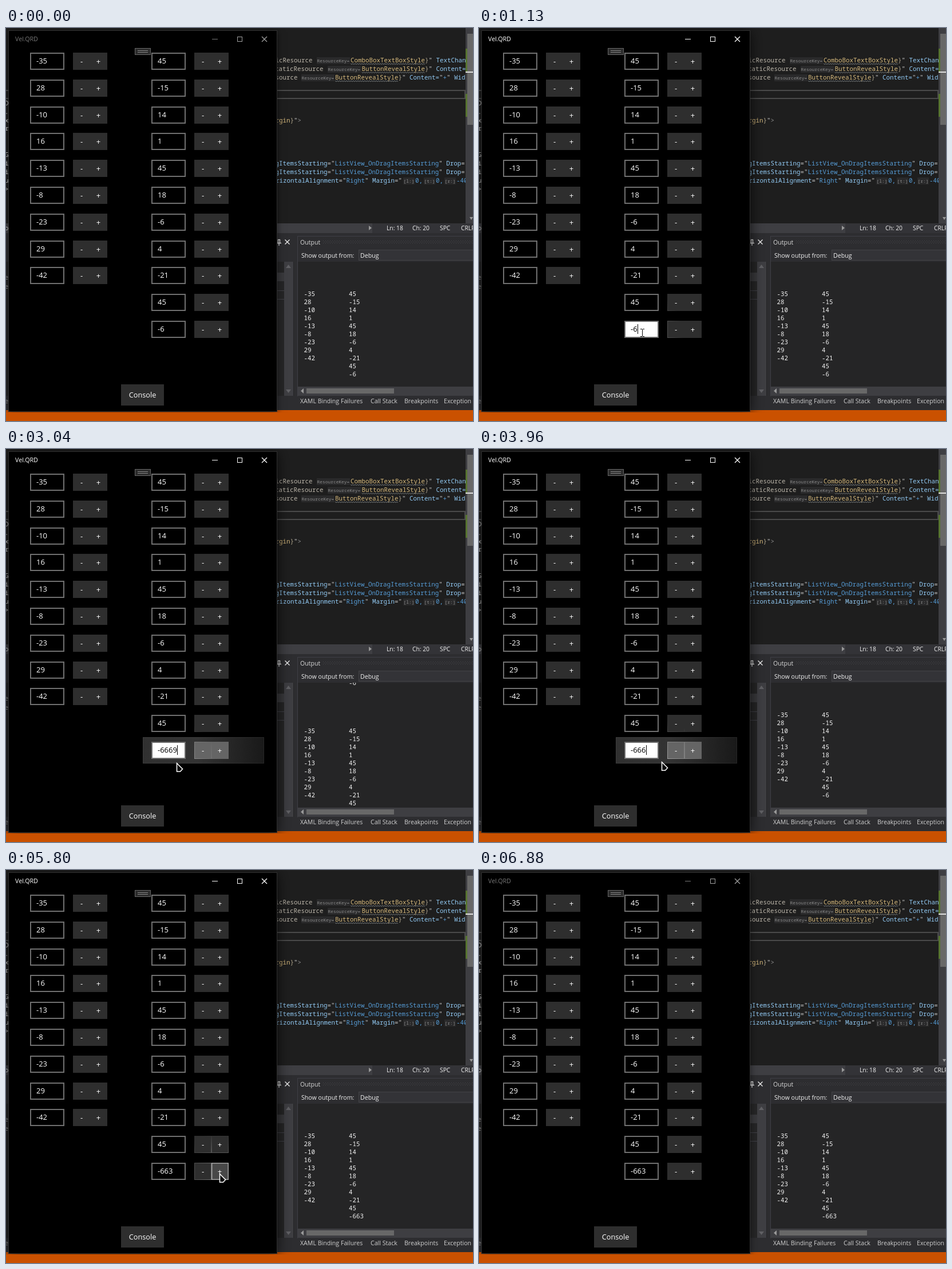
An HTML page with a canvas that plays this animation: 816x686 px, repeating every 6970 ms.

```html
<!DOCTYPE html>
<html lang="en">
<head>
<meta charset="utf-8">
<title>List editor</title>
<style>
html, body { margin: 0; width: 100%; height: 100%; overflow: hidden; background: #1e1e1e; }
canvas { display: block; }
</style>
</head>
<body>
<canvas id="stage" width="816" height="686"></canvas>
<script>
const ctx = document.getElementById('stage').getContext('2d');
const LOOP = 6970;
const UI = '"Open Sans", "Noto Sans", sans-serif';
const MONO = '"Noto Sans Mono", "DejaVu Sans Mono", monospace';
const CODE = '10.83px ' + MONO;
const LABEL = '10.6px ' + UI;
const TAN = '#d7ba7d', ATTR = '#92caf4', VALUE = '#569cd6', PLAIN = '#c8c8c8';

const left = [-35, 28, -10, 16, -13, -8, -23, 29, -42];
const right = [45, -15, 14, 1, 45, 18, -6, 4, -21, 45];

// time, x, y
const path = [
  [220, 744, 678], [600, 430, 584], [800, 318, 547], [910, 285, 531],
  [2850, 285, 531], [3030, 298, 548], [3740, 298, 548], [3820, 300, 552],
  [4100, 338, 540], [4410, 373, 530], [6190, 373, 530], [6340, 440, 558], [6710, 764, 682]
];
// time, text of the last box
const typed = [[0, '-6'], [2210, '-66'], [2530, '-666'], [2660, '-6669'], [3410, '-666'],
  [4830, '-665'], [5100, '-664'], [5330, '-663']];
// start, lines after the first jump, value printed
const prints = [[3040, 14, '-6'], [4870, 4, '-665'], [5140, 4, '-664'], [5560, 4, '-663']];

function box(x, y, w, h, fill) {
  ctx.fillStyle = fill;
  ctx.fillRect(x, y, w, h);
}
function frame(x, y, w, h, color, line = 1) {
  ctx.strokeStyle = color;
  ctx.lineWidth = line;
  ctx.strokeRect(x + line / 2, y + line / 2, w - line, h - line);
}
function text(s, x, y, color, font = LABEL, align = 'left') {
  ctx.font = font;
  ctx.fillStyle = color;
  ctx.textAlign = align;
  ctx.fillText(s, x, y);
}
function poly(points, color, closed) {
  ctx.beginPath();
  points.forEach(([x, y]) => ctx.lineTo(x, y));
  if (closed) {
    ctx.fillStyle = color;
    ctx.fill();
  } else {
    ctx.strokeStyle = color;
    ctx.stroke();
  }
}
function cross(x, y, r, color) {
  ctx.lineWidth = 1.2;
  poly([[x - r, y - r], [x + r, y + r]], color);
  poly([[x - r, y + r], [x + r, y - r]], color);
}
const inside = (p, x, y, w, h) => p && p.x >= x && p.x < x + w && p.y >= y && p.y < y + h;

// Runs of [text, color] set one after another
function code(x, y, ...runs) {
  for (const [s, color] of runs) {
    text(s, x, y, color, CODE);
    x += ctx.measureText(s).width;
  }
}
function chip(s, x, y, w) {
  box(x, y - 9, w, 12, '#2a2a2b');
  text(s, x + 0.5, y - 0.5, '#8c8c8c', '7.9px ' + MONO);
}
function squiggle(x, y, w) {
  ctx.lineWidth = 0.8;
  const pts = [];
  for (let i = 0; i <= w; i += 2) pts.push([x + i, y + (i % 4 ? 1.5 : 0)]);
  poly(pts, '#8f9698');
}

function drawCode() {
  box(0, 0, 816, 341, '#1e1e1e');
  frame(-2, 108, 805, 16, '#4a4a4a', 2);

  const styles = [
    [60, 470.5, 'icResource', 543, 602, 'ComboBoxTextBoxStyle'],
    [75, 470, 'taticResource', 562, 621.5, 'ButtonRevealStyle'],
    [90, 470.5, 'source', 516, 575, 'ButtonRevealStyle']
  ];
  const tails = [
    [[' TextChanged=', ATTR]],
    [[' Content=', ATTR]],
    [[' Content=', ATTR], ['"', PLAIN], ['+', VALUE], ['"', PLAIN], [' Width=', ATTR]]
  ];
  styles.forEach(([y, x, head, cx, sx, name], i) => {
    code(x, y, [head, '#bdb7ab']);
    chip('ResourceKey=', cx, y, 58);
    code(sx, y, [name, TAN], ['}', '#a9a08c'], ['"', PLAIN], ...tails[i]);
    squiggle(sx, y + 2, name.length * 6.5);
  });
  code(470.5, 165, ['rgin', TAN], ['}', '#b1a68c'], ['"', PLAIN], ['>', '#909090']);
  for (const y of [240, 255]) {
    code(470.5, y, ['gItemsStarting', ATTR], ['="', PLAIN],
      ['ListView_OnDragItemsStarting', VALUE], ['"', PLAIN], [' Drop', ATTR], ['=', PLAIN]);
  }
  code(471, 270, ['rizontalAlignment', ATTR], ['="', PLAIN], ['Right', VALUE], ['"', PLAIN],
    [' Margin', ATTR], ['="', PLAIN]);
  ['[l:]', '[t:]', '[r:]'].forEach((s, i) => {
    chip(s, 694 + i * 36, 270, 20);
    code(715 + i * 36, 270, [i < 2 ? '0,' : '-40', VALUE]);
  });
  [['D', 135], ['.', 150], ['x', 165], ['r', 179], ['G', 225], ['i', 240], ['i', 255], ['u', 270], ['>', 285]]
    .forEach(([s, y]) => text(s, -2, y, PLAIN, CODE));

  // Scroll bar with change marks
  box(803, 0, 13, 341, '#3e3e42');
  box(806, 10, 10, 159, '#686868');
  box(803, 36, 3, 40, '#577430');
  box(803, 115, 3, 40, '#577430');
  box(803, 76, 13, 2, '#e0e0e0');
  poly([[810, 330], [816, 330], [813, 335]], '#999', true);
}

function drawPanels() {
  box(0, 341, 816, 326, '#2d2d30');
  box(0, 341, 640, 17, '#3e3e42');
  box(640, 341, 176, 17, '#333337');
  poly([[634, 345], [639, 349], [634, 353]], '#999', true);
  [['Ln: 18', 665], ['Ch: 20', 710], ['SPC', 758], ['CRLF', 795]]
    .forEach(([s, x]) => text(s, x, 353, '#f1f1f1', '10.3px ' + UI));
  text('o', -2, 353, '#ddd');

  // Side panel
  box(0, 408, 503, 234, '#252526');
  box(474, 427, 12, 15, '#38383b');
  box(474, 458, 12, 1, '#3f3f46');
  box(474, 473, 12, 1, '#3f3f46');
  box(486, 408, 16, 234, '#3e3e42');
  poly([[489, 419], [498, 419], [493.5, 413]], '#606064', true);
  poly([[489, 631], [498, 631], [493.5, 637]], '#606064', true);
  ctx.lineWidth = 1.3;
  ctx.strokeStyle = '#e0e0e0';
  ctx.strokeRect(475.5, 369.5, 3, 6);
  poly([[473, 375.5], [481, 375.5]], '#e0e0e0');
  poly([[477, 376], [477, 380]], '#e0e0e0');
  cross(491.5, 373.5, 4, '#f1f1f1');
  for (const y of [439, 455, 655]) text('e', -2, y, '#999');

  // Output panel
  box(509, 363, 1, 280, '#3f3f46');
  box(510, 363, 306, 1, '#3f3f46');
  text('Output', 514, 378, '#d8d8d8');
  for (let r = 0; r < 3; r++)
    for (let x = 554 + (r % 2) * 2; x < 816; x += 4) box(x, 371 + r * 2, 1, 1, '#46464a');
  text('Show output from:', 516, 401, '#f1f1f1');
  box(616, 387, 204, 19, '#333337');
  frame(616, 387, 204, 19, '#434346');
  text('Debug', 619, 401, '#f1f1f1');
  box(510, 408, 306, 218, '#252526');
  box(510, 626, 306, 16, '#3e3e42');
  box(525, 629, 153, 9, '#686868');
  poly([[520, 629], [520, 638], [515, 633.5]], '#999', true);
  [['XAML Binding Failures', 514], ['Call Stack', 637], ['Breakpoints', 696], ['Exception Settings', 765]]
    .forEach(([s, x]) => text(s, x, 655, '#d0d0d0'));
  box(0, 667, 816, 19, '#ca5100');
}

function printBlock(y, last) {
  [...right, last].forEach((v, i) => {
    if (i < left.length) text(left[i], 520.5, y + i * 14, '#f4f4f4', CODE);
    text(v, 599, y + i * 14, '#f4f4f4', CODE);
  });
}
function drawOutput(t) {
  let last = '-6', old = '-6', lines = 16;
  for (const [start, jump, value] of prints) {
    if (t < start) break;
    old = last;
    last = value;
    lines = t < start + 40 ? jump : 16;
  }
  ctx.save();
  ctx.beginPath();
  ctx.rect(510, 408, 306, 218);
  ctx.clip();
  printBlock(468 - lines * 14, old);
  printBlock(468 + (16 - lines) * 14, last);
  ctx.restore();
}

function drawWindow(active) {
  // The shadow stays clear of the status bar
  ctx.save();
  ctx.beginPath();
  ctx.rect(0, 0, 816, 671);
  ctx.clip();
  ctx.shadowColor = active ? 'rgba(0,0,0,.7)' : 'rgba(0,0,0,.5)';
  ctx.shadowBlur = active ? 22 : 12;
  ctx.shadowOffsetY = 3;
  box(5, 4, 469, 666, '#000');
  ctx.restore();
  frame(4, 4, 470, 666, '#303030');
  text('Vel.QRD', 16, 23, active ? '#fff' : '#777', '10.7px ' + UI);
  const ink = active ? '#fff' : '#a0a0a0';
  box(360, 19, 10, 1, active ? '#fff' : '#777');
  frame(404, 15, 9, 9, ink);
  cross(451.5, 19.5, 4.5, ink);
}

function drawCell(x, y, value, focused) {
  box(x, y, 60, 30, focused ? '#fff' : 'rgba(0,0,0,.45)');
  frame(x, y, 60, 30, '#707070', 2);
  text(value, x + 11, y + 19, focused ? '#000' : '#fff', '13px ' + UI);
  if (focused) box(Math.round(x + 11.5 + ctx.measureText(value).width), y + 6, 1, 17, '#000');
}

function drawButtons(x, y, p, lit) {
  const plus = inside(p, x + 30, y, 30, 30);
  const fill = lit ? '#656565' : '#2e2e2e';
  box(x, y, 30, 30, fill);
  box(x + 30, y, 30, 30, !plus ? fill : lit ? '#555' : '#484848');
  if (p && Math.hypot(p.x - x - 30, p.y - y - 15) < 110) {
    const glow = ctx.createRadialGradient(p.x, p.y, 0, p.x, p.y, 72);
    glow.addColorStop(0, 'rgba(255,255,255,.42)');
    glow.addColorStop(1, 'rgba(255,255,255,0)');
    frame(x, y, 30, 30, glow);
    frame(x + 30, y, 30, 30, glow);
    if (plus && !lit) frame(x + 30, y, 30, 30, '#a0a0a0', 1.5);
  }
  text('-', x + 15, y + 20, '#fff', '13px ' + UI, 'center');
  text('+', x + 44.5, y + 20, '#fff', '13px ' + UI, 'center');
}

function drawLists(t, p) {
  const rowY = i => Math.round(43 + i * 46.8);
  left.forEach((v, i) => {
    drawCell(42, rowY(i), v);
    drawButtons(117, rowY(i), null);
  });
  right.forEach((v, i) => {
    drawCell(254, rowY(i), v);
    drawButtons(329, rowY(i), p);
  });

  const held = (t >= 1090 && t < 2850) || (t >= 4650 && t < 6190);
  const hover = !held && inside(p, 239, 503, 212, 50);
  if (hover) {
    const shade = ctx.createLinearGradient(239, 0, 451, 0);
    const far = p.x < 340;
    shade.addColorStop(0, far ? '#303030' : '#262626');
    shade.addColorStop(0.45, '#333');
    shade.addColorStop(1, far ? '#191919' : '#2e2e2e');
    box(239, 503, 212, 46, shade);
    frame(239, 503, 212, 46, 'rgba(255,255,255,.06)');
  }
  const value = typed.filter(k => k[0] <= t).pop()[1];
  drawCell(254, 511, value, t >= 1090 && t < 4500);
  drawButtons(329, 511, p, hover);

  box(225, 35, 28, 12, '#2b2b2b');
  frame(225, 35, 28, 12, '#666');
  box(230, 39, 18, 1, '#888');
  box(230, 42, 18, 1, '#888');
  box(201, 622, 75, 37, '#2e2e2e');
  text('Console', 238.5, 645, '#fff', '12.7px ' + UI, 'center');
}

function pointer(t) {
  if (t < 220 || t >= 6710) return null;
  const i = path.findIndex(k => k[0] > t);
  const [t0, x0, y0] = path[i - 1], [t1, x1, y1] = path[i];
  const k = (t - t0) / (t1 - t0);
  return { x: x0 + (x1 - x0) * k, y: y0 + (y1 - y0) * k };
}
function drawPointer(p, focused) {
  if (!p) return;
  ctx.save();
  ctx.translate(Math.round(p.x), Math.round(p.y));
  if (inside(p, 254, 511, 60, 30)) {
    const ink = focused ? '#000' : '#fff';
    box(0, -5, 1, 12, ink);
    for (const y of [-6, 7]) {
      box(-3, y, 3, 1, ink);
      box(1, y, 3, 1, ink);
    }
  } else {
    ctx.beginPath();
    [[0.5, 0.5], [10.5, 10.5], [6.5, 15], [0.5, 15]].forEach(([x, y]) => ctx.lineTo(x, y));
    ctx.closePath();
    ctx.fillStyle = '#0c0c0c';
    ctx.fill();
    ctx.strokeStyle = '#fff';
    ctx.lineWidth = 1.5;
    ctx.stroke();
  }
  ctx.restore();
}

function draw() {
  const t = performance.now() % LOOP;
  const p = pointer(t);
  drawCode();
  drawPanels();
  drawOutput(t);
  drawWindow(t >= 1090 && t < 6880);
  drawLists(t, p);
  drawPointer(p, t >= 1090 && t < 4500);
  requestAnimationFrame(draw);
}
draw();
</script>
</body>
</html>
```
